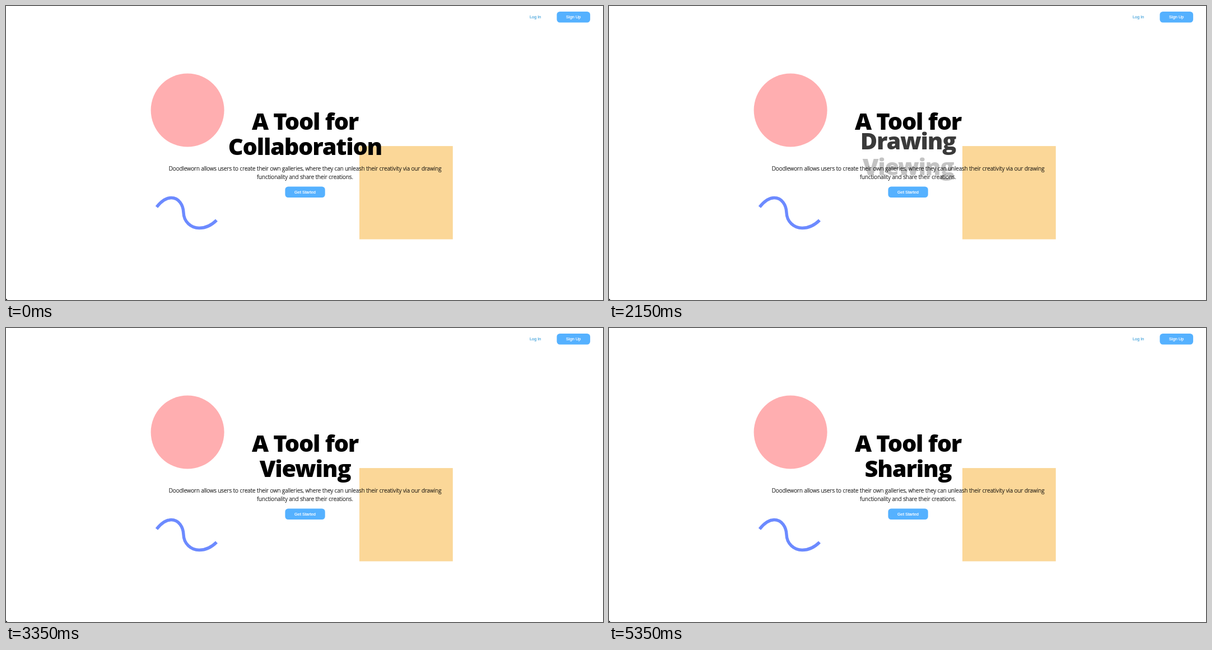
Animation of 1066 by 525 pixels, one loop 5.8 s. Source, as an HTML page:

```html
<!DOCTYPE html>
<html lang="en">
<head>
<meta charset="utf-8">
<title>A Tool for Collaboration</title>
<style>
  html, body { margin: 0; width: 100%; height: 100%; overflow: hidden; background: #fff; }
  svg { display: block; width: 1066px; height: 525px; }
  text { text-anchor: middle; }
  .title { font: 800 41.5px "Open Sans", sans-serif; letter-spacing: -1.25px; }
  .intro { font: 300 10px "Open Sans", sans-serif; stroke: #000; stroke-width: .22px; }
  .label { font: 7.42px "Liberation Sans", Arial, sans-serif; fill: #fff; stroke: #fff; stroke-width: .2px; }
  .link { fill: #4ba6dc; stroke: #4ba6dc; }
  .button { fill: #55b1ff; }
</style>
</head>
<body>
<svg viewBox="0 0 1066 525">
  <circle cx="324.1" cy="186.1" r="65.5" fill="#ffaeb0"/>
  <rect x="631" y="250.1" width="166.8" height="166.5" fill="#fbd798"/>
  <path d="M269 359C277 349 286 342.6 295 342.6C309 342.6 316.5 356 317 369C317.5 385 330 396.5 345 396.5C357 396.5 368 390.5 376 382.5"
        fill="none" stroke="#6c8aff" stroke-width="5.5"/>
  <path d="M0 522.5L2.5 525H0z"/>

  <text class="label link" x="945.2" y="22.4">Log In</text>
  <rect class="button" x="983.5" y="10" width="59.6" height="19.5" rx="5.5"/>
  <text class="label" x="1013.3" y="22.4">Sign Up</text>

  <text class="title" x="534" y="220.6">A Tool for</text>
  <text class="title" id="leaving" x="534" y="266.4"></text>
  <text class="title" id="entering" x="534" y="266.4"></text>

  <text class="intro" x="777.5" y="293.6" style="text-anchor:end">Doodleworn allows users to create their own galleries, where they can unleash their creativity via our drawing</text>
  <text class="intro" x="534" y="308.7">functionality and share their creations.</text>
  <rect class="button" x="498.4" y="322.5" width="71.3" height="19.5" rx="5.5"/>
  <text class="label" x="534" y="334.9">Get Started</text>
</svg>
<script>
  const WORDS = ['Collaboration', 'Drawing', 'Viewing', 'Sharing'];
  const LOOP = 5800, PERIOD = 2000, FIRST = 150, TICK = 50, LINE = 46;
  const leaving = document.getElementById('leaving');
  const entering = document.getElementById('entering');

  // Damped spring from 0 to 1: tension 120, friction 14, time in seconds.
  function spring(s) {
    const decay = 7, freq = Math.sqrt(120 - decay * decay);
    return 1 - Math.exp(-decay * s) * (Math.cos(freq * s) + decay / freq * Math.sin(freq * s));
  }

  // Each swap starts, stalls for 650 ms, then springs into place.
  function progress(ms) {
    if (ms < 650) return spring(0.075);
    if (ms >= 1200) return 1;
    return spring(Math.min(0.19 + (ms - 650) / 1000, 0.59));
  }

  function place(node, word, offset, opacity) {
    node.textContent = word;
    node.setAttribute('transform', `translate(0 ${offset})`);
    node.setAttribute('opacity', Math.max(0, Math.min(1, opacity)));
  }

  function draw(now) {
    const time = Math.floor(now % LOOP / TICK) * TICK - FIRST;
    const swap = Math.floor(time / PERIOD);
    const p = swap < 0 ? 1 : progress(time - swap * PERIOD);
    place(leaving, WORDS[swap] || '', -LINE * p, 1 - p);
    place(entering, WORDS[swap + 1], LINE * (1 - p), p);
  }

  const start = performance.now();
  function frame() {
    draw(performance.now() - start);
    requestAnimationFrame(frame);
  }
  frame();
</script>
</body>
</html>
```
